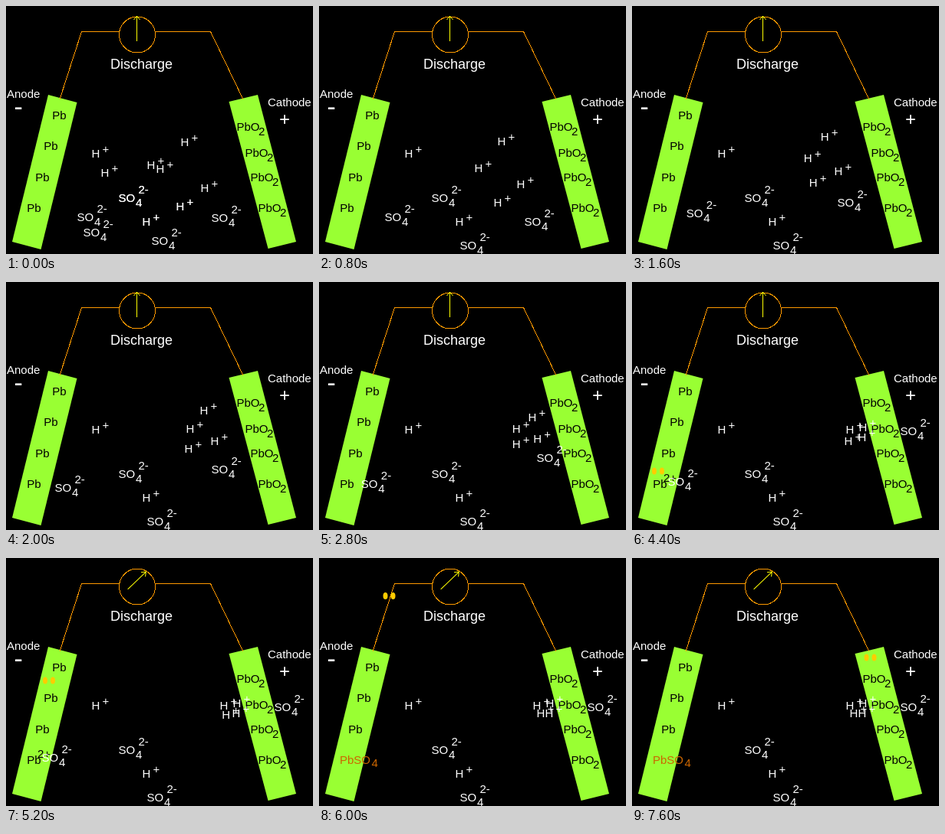
Animation, 400 px wide and 324 px high, one loop 8000 ms. Source, as an HTML page:

```html
<!DOCTYPE html>
<html lang="en">
<head>
<meta charset="utf-8">
<title>Lead-acid cell discharge</title>
<style>
  html, body { margin: 0; width: 100%; height: 100%; overflow: hidden; background: #000; }
  svg { display: block; width: 100%; height: 100%; }
  text { font-family: "Liberation Sans", Arial, sans-serif; }
</style>
</head>
<body>
<svg viewBox="0 0 400 324" xmlns="http://www.w3.org/2000/svg">
  <rect width="400" height="324" fill="#000"/>
  <g fill="#9f3">
    <path d="M55 116L92.5 126L45.5 318L8 308Z"/>
    <path d="M290.5 125L328 116L378 308L341.5 317Z"/>
  </g>
  <g fill="none" stroke="#f90" shape-rendering="crispEdges">
    <path d="M70 122L98.5 33.5H147.5M194.5 33.5H266.5L309 122"/>
    <circle cx="171" cy="37.5" r="23.5"/>
  </g>
  <path id="needle" d="M0 16.5V-16.5M-4 -11.5L0 -16.5L4 -11.5" fill="none" stroke="#ff0"/>
  <g id="labels"></g>
  <g id="ions"></g>
  <g id="electrons" fill="#fc0">
    <ellipse rx="3" ry="4.5"/>
    <ellipse cx="10" rx="3" ry="4.5"/>
  </g>
</svg>
<script>
const LOOP = 8000, STEP = 400;
const SPLIT = 12, BOND = 15; // steps where lead gives up electrons, then binds sulfate
const NS = 'http://www.w3.org/2000/svg';
const $ = id => document.getElementById(id);

function add(parent, tag, attrs = {}, content = '') {
  const el = document.createElementNS(NS, tag);
  for (const key in attrs) el.setAttribute(key, attrs[key]);
  el.textContent = content;
  return parent.appendChild(el);
}

const write = (parent, str, x, y, fill = '#fff', size = 15) =>
  add(parent, 'text', { x, y, fill, 'font-size': size }, str);
const show = (el, on) => el.setAttribute('visibility', on ? 'visible' : 'hidden');
const move = (el, [x, y]) => el.setAttribute('transform', `translate(${x} ${y})`);

// Position on a polyline whose corners are reached at u = 0, 1, 2, ...
function along(points, u) {
  const last = points.length - 1;
  u = Math.min(Math.max(u, 0), last);
  const i = Math.floor(u), a = points[i], b = points[Math.min(i + 1, last)];
  return a.map((v, k) => v + (b[k] - v) * (u - i));
}

// Fixed lettering
const labels = $('labels');
write(labels, 'Discharge', 136, 82, '#fff', 18);
write(labels, 'Anode', 1, 120);
write(labels, 'Cathode', 341, 131);
write(labels, '-', 10.5, 143, '#fff', 34);
write(labels, '+', 356, 156, '#fff', 24);

const leads = [0, 1, 2, 3].map(i => write(labels, 'Pb', 60.3 - 11 * i, 148 + 40.3 * i, '#000'));

for (const [x, y] of [[300.5, 163], [311.5, 197], [318.5, 229], [328.5, 269]]) {
  write(labels, 'PbO', x, y, '#000');
  write(labels, '2', x + 28.5, y + 6, '#000');
}

const charge = write(labels, '2+', 41, 261, '#000');
const sulfate = add(labels, 'g');
write(sulfate, 'PbSO', 27, 269, '#c60');
write(sulfate, '4', 68.5, 273, '#c60');

// Ions are placed by the left edge and middle of their first letter
function hydrogen() {
  const g = add($('ions'), 'g');
  write(g, 'H', -0.5, 5);
  write(g, '+', 13.5, -1);
  return g;
}

function so4() {
  const g = add($('ions'), 'g');
  write(g, 'SO', -0.5, 5);
  write(g, '4', 22, 11);
  write(g, '2-', 25.5, -6);
  return g;
}

// Each ion passes one point of its path every three steps.
// Some also have an earlier place, which the opening pose overlays.
function ion(make, path, before) {
  const echo = before && make();
  if (echo) move(echo, before);
  return { el: make(), path, echo };
}

const anodeIon = ion(so4, [[93, 276], [86, 276], [64, 269], [51, 261], [47, 261]], [101, 296]);
const ions = [
  anodeIon,
  ion(so4, [[147, 251]], [147, 251]),
  ion(so4, [[190, 307], [184, 313]]),
  ion(so4, [[268, 277], [268, 282], [268, 245], [292, 222], [350, 195]]),
  ion(hydrogen, [[112, 193]], [124, 218]),
  ion(hydrogen, [[178, 282]], [178, 282]),
  ion(hydrogen, [[196, 213], [203, 212], [235, 192], [261, 192], [279, 193]], [184, 208]),
  ion(hydrogen, [[228, 178], [233, 177], [253, 168], [283, 182], [296, 190]]),
  ion(hydrogen, [[222, 262], [228, 257], [233, 218], [262, 209], [277, 208], [284, 203]], [222, 262]),
  ion(hydrogen, [[254, 238], [258, 233], [267, 208], [286, 203], [295, 203]])
];

// Electrons pass one point every two steps
const circuit = [[29, 247], [51, 160], [86.5, 49.5], [233, 33.5], [305.5, 130]];

// The picture holds each step; the first one is split in two
const stepAt = t => t < STEP / 2 ? 0 : 1 + Math.floor(t / STEP);

function draw(t) {
  const step = stepAt(t);
  for (const { el, path, echo } of ions) {
    move(el, along(path, step / 3));
    if (!echo) continue;
    show(echo, step < 2);
    show(el, step !== 1);
  }

  const bonded = step >= BOND;
  if (bonded) show(anodeIon.el, false);
  show(leads[3], !bonded);
  show(charge, step >= SPLIT && !bonded);
  show(sulfate, bonded);

  show($('electrons'), step >= SPLIT);
  move($('electrons'), along(circuit, (step - SPLIT) / 2));

  const angle = 23 * Math.min(Math.max(step - SPLIT, 0), 2);
  $('needle').setAttribute('transform', `translate(170.5 29.5) rotate(${angle})`);
}

function tick() {
  draw(performance.now() % LOOP);
  requestAnimationFrame(tick);
}
tick();
</script>
</body>
</html>
```
